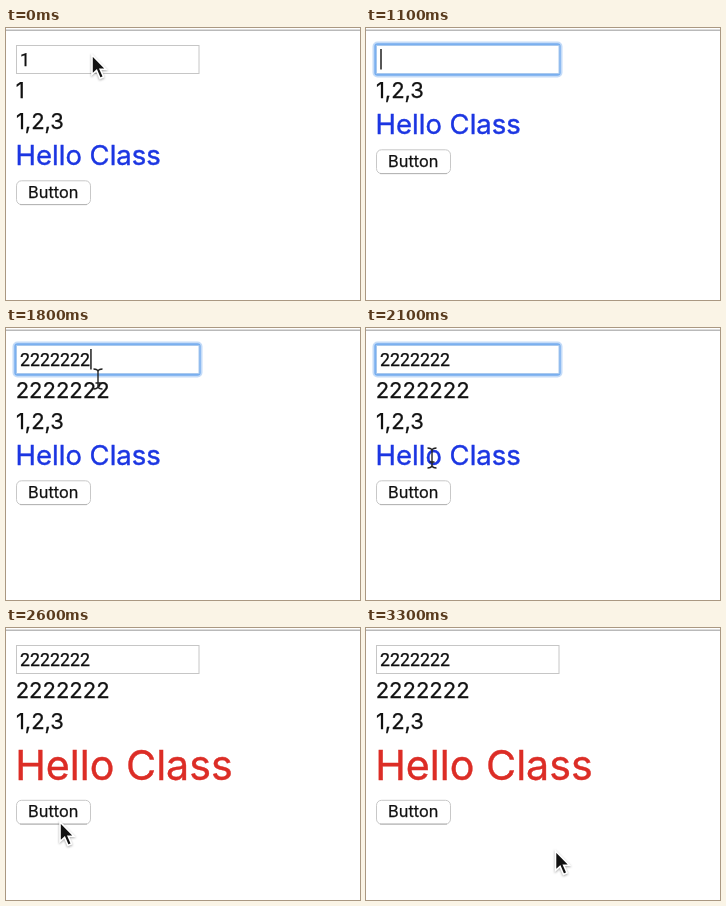
An HTML page for the animation above (3.4 s loop, 354x272 px).

```html
<!DOCTYPE html>
<html lang="en">
<head>
<meta charset="utf-8">
<title>Form binding demo</title>
<style>
  html, body { margin: 0; width: 100%; height: 100%; overflow: hidden; background: #fff; }
  svg { display: block; width: 354px; height: 272px; }
  text { font-family: Inter, "Liberation Sans", sans-serif; fill: #111; stroke: #111; stroke-width: .25; white-space: pre; }
  .line { font-size: 22px; }
  .ui { font-size: 16.3px; }
  #value { font: 17.8px Roboto, "Liberation Sans", sans-serif; }
  #hello { font-size: 27.5px; fill: #1c36e2; stroke: #1c36e2; stroke-width: .4; }
  #hello.big { font-size: 41.2px; fill: #dc2d26; stroke: #dc2d26; }
  #ring { filter: blur(.7px); }
  #arrow { filter: drop-shadow(0 1px 1px #0005); }
</style>
</head>
<body>
<svg viewBox="0 0 354 272">
  <rect width="354" height="272" fill="#fff"/>
  <rect y="1.5" width="354" height="1.5" fill="#b9b9b9"/>

  <g id="ring" fill="none" stroke="#6fa9ee">
    <rect x="8" y="15" width="187" height="33" rx="3.5" stroke-width="3" opacity=".4"/>
    <rect x="9.5" y="16.5" width="184" height="30" rx="2" stroke-width="2.4" opacity=".9"/>
  </g>
  <rect id="box" x="10.5" y="17.5" width="182.5" height="28" fill="#fff" stroke="#c6c6c6"/>
  <text id="value" x="14" y="37.6"></text>
  <rect id="caret" y="21" width="1.4" height="20.5" fill="#111"/>

  <text id="echo" class="line" x="9.7" y="69.6"></text>
  <g id="below">
    <text class="line" x="9.9" y="100.5">1,2,3</text>
    <text id="hello">Hello Class</text>
    <g id="button">
      <rect x="10.5" y="152.8" width="74" height="23.8" rx="5" fill="#fff" stroke="#c8c8c8"/>
      <path d="M14 176.6H81" stroke="#b4b4b4"/>
      <text class="ui" x="47.2" y="169.6" text-anchor="middle">Button</text>
    </g>
  </g>

  <path id="arrow" d="M0 0V19.5L4.6 15.4L8 23.4L11.6 21.8L8.2 14.2H14Z"
        fill="#111" stroke="#fff" stroke-width="1.6"/>
  <path id="beam" d="M-4.5 -10Q-.5 -10 0 -7.5Q.5 -10 4.5 -10M0 -8V8M-4.5 10Q-.5 10 0 7.5Q.5 10 4.5 10M-2.5 4H2.5"
        fill="none" stroke="#222" stroke-width="1.4"/>
</svg>
<script>
const LOOP = 3400, STEP = 100;
const $ = id => document.getElementById(id);

// Each track holds its latest entry: [time, ...state]
const typed = [[0, "1"], [1000, ""], [1500, "2"], [1600, "222"], [1700, "22222"], [1800, "2222222"]];
const focus = [[0, false], [500, true], [2600, false]];
const caret = [[0, false], [500, true], [700, false], [900, true], [1400, false],
               [1500, true], [2100, false], [2300, true], [2600, false]];
const large = [[0, false], [2600, true]];
const mouse = [
  [0, "arrow", 86, 27], [100, "beam", 79, 30], [200, "beam", 67, 31], [300, "beam", 58, 31],
  [900, "none", 0, 0],
  [1800, "beam", 92, 51], [1900, "beam", 89, 70], [2000, "beam", 80, 100], [2100, "beam", 66, 130],
  [2200, "arrow", 56, 152], [2300, "arrow", 50.5, 159.5], [2600, "arrow", 54, 194],
  [2800, "arrow", 62, 176], [2900, "beam", 72, 150], [3000, "beam", 77, 138.5],
  [3100, "arrow", 115, 172], [3200, "arrow", 160, 205], [3300, "arrow", 189.5, 223]
];

const at = (track, t) => track.findLast(entry => entry[0] <= t).slice(1);
const show = (id, on) => $(id).setAttribute("visibility", on ? "visible" : "hidden");
const move = (id, x, y) => $(id).setAttribute("transform", `translate(${x} ${y})`);
const set = (id, attrs) => Object.entries(attrs).forEach(([k, v]) => $(id).setAttribute(k, v));

function draw(t) {
  const [text] = at(typed, t), [focused] = at(focus, t), [big] = at(large, t);
  const [kind, x, y] = at(mouse, t);

  $("value").textContent = $("echo").textContent = text;
  const width = text ? $("value").getComputedTextLength() : 0;
  set("caret", { x: 14.3 + width });
  show("caret", at(caret, t)[0]);
  show("ring", focused);
  set("box", { stroke: focused ? "#a9c9ee" : "#c6c6c6" });

  // An empty echo line collapses and pulls the content up
  move("below", 0, text ? 0 : -31);
  move("button", 0, big ? 19.5 : 0);
  set("hello", big ? { x: 9.2, y: 151.6, class: "big" } : { x: 9.6, y: 136.6, class: "" });

  for (const id of ["arrow", "beam"]) {
    show(id, kind === id);
    move(id, x, y);
  }
}

const start = performance.now();
function tick() {
  const t = (performance.now() - start) % LOOP;
  draw(Math.floor(t / STEP) * STEP);
  requestAnimationFrame(tick);
}
tick();
</script>
</body>
</html>
```
